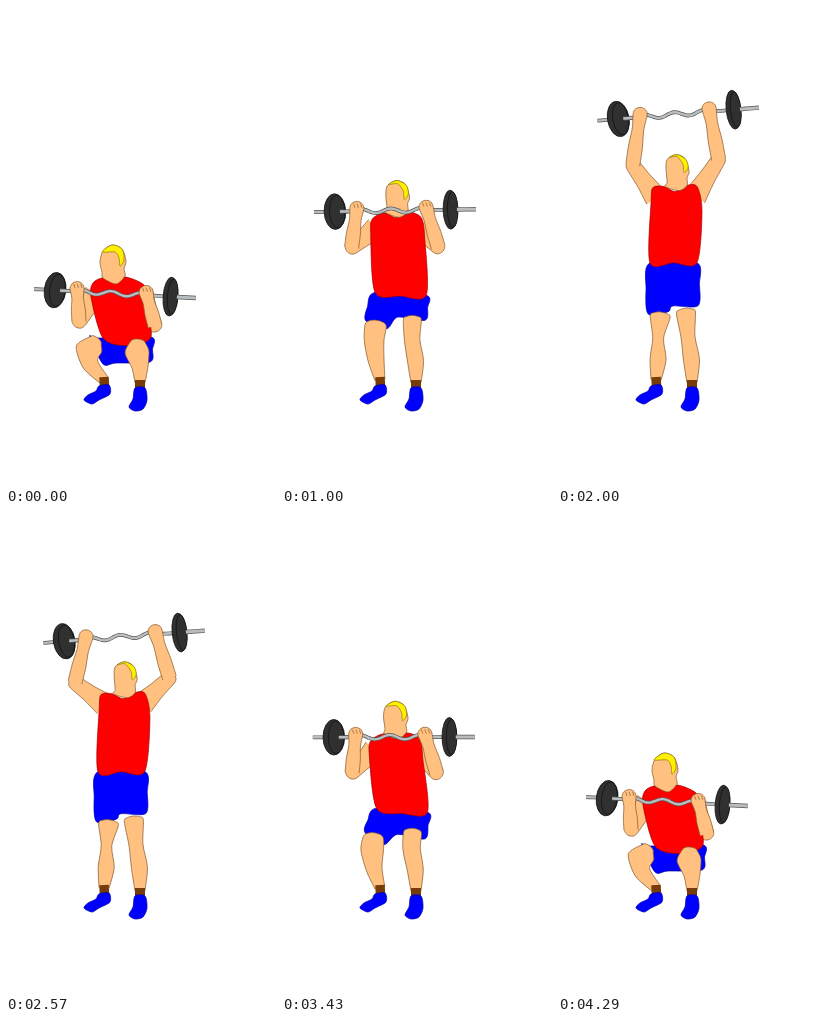
Write an HTML page with a canvas that moves like this. It is 270 px wide and 480 px high and loops after 4.44 s.

```html
<!DOCTYPE html>
<html lang="en">
<head>
<meta charset="utf-8">
<title>Squat press</title>
<style>
  html, body { margin: 0; width: 100%; height: 100%; overflow: hidden; background: #fff; }
  canvas { display: block; width: 100%; height: 100%; }
</style>
</head>
<body>
<canvas id="stage" width="270" height="480"></canvas>
<script>
const ctx = document.getElementById('stage').getContext('2d');
const LOOP = 4440, FPS = 7, TOP = 15;
const SKIN = '#ffc080', SKIN_EDGE = '#80552c', RED = '#ff0000', BLUE = '#0000ff',
      YELLOW = '#fff000', SOCK = '#783c08', IRON = '#303030';

// Joints at five moments, from the squat to the full press; a third number is a half width.
const STEPS = [0, 4, 8, 11, TOP];
const JOINTS = {
  neck:      [[108, 272], [111, 244], [115, 196], [117, 181], [117, 181]],
  shoulderL: [[87, 277], [87, 251], [92, 201], [95, 182], [95, 182]],
  shoulderR: [[138, 279], [136, 250], [140, 200], [139, 181], [139, 181]],
  elbowL:    [[73, 316], [71, 288], [69, 225], [67, 177], [76, 158]],
  elbowR:    [[149, 320], [152, 290], [158, 224], [164, 173], [160, 152]],
  waistL:    [[97, 332], [97, 309], [92, 279], [92, 260], [92, 257]],
  waistR:    [[145, 331], [147, 314], [143, 281], [139, 260], [139, 257]],
  cuffL:     [[84, 331], [82, 325], [85, 312], [90, 308], [90, 308]],
  inseam:    [[97, 358], [97, 345], [107, 316], [110, 306], [110, 306]],
  crotch:    [[110, 357], [114, 338], [116, 304], [115, 300], [115, 300]],
  cuffR:     [[144, 356], [142, 344], [143, 306], [140, 300], [140, 300]],
  thighL:    [[90, 335, 7], [88, 331, 9], [96, 316, 11], [102, 311, 10], [102, 311, 10]],
  kneeL:     [[83, 343, 13], [87, 339, 13.5], [94, 333, 8.5], [100, 332, 5.5], [100, 332, 5.5]],
  thighR:    [[132, 337, 8], [131, 328, 9], [130, 310, 9], [128, 307, 9.5], [128, 307, 9.5]],
  kneeR:     [[131, 346, 12], [129, 338, 10.5], [130.5, 333, 7], [130, 331, 7], [130, 331, 7]]
};
// Centre and tilt in degrees
const BAR = [[109, 287.5, 3.2], [110, 255, 1.4], [114, 186.5, -1.8], [117, 133.5, -4], [120.5, 106, -4.6]];

// Head outlines around the neck, looking ahead and looking up
const FACE = [
  [[-11, -27], [-2, -33], [8, -29], [12, -17], [10, -9], [11, -2], [2, 6], [-11, 0], [-12, -6], [-14, -16]],
  [[-8, -27], [1, -32], [10, -28], [14, -15], [12, -9], [12, -1], [4, 4], [-10, 0], [-8, -4], [-9, -18]]
];
const HAIR = [
  [[-12, -26], [-2, -33], [8, -29], [10, -18], [6, -12], [5, -20], [1, -26]],
  [[-6, -29], [2, -32], [11, -27], [13, -19], [9, -14], [8, -22], [2, -30]]
];
const SHOE_L = [[93, 380], [103, 379], [104, 388], [93, 394], [86, 398], [78, 394], [82, 389], [90, 385]];
const SHOE_R = [[129, 382], [139, 382], [141, 394], [137, 403], [129, 405], [123, 401], [127, 393]];

const mix = (a, b, t) => a.map((v, i) => v + (b[i] - v) * t);
const add = (p, x, y) => [p[0] + x, p[1] + y];
const clamp = v => Math.max(0, Math.min(1, v));

// Smooth interpolation through the steps, at rest at both ends
function track(keys, k) {
  const last = STEPS.length - 1;
  const i = Math.min(last - 1, STEPS.findLastIndex(s => s <= k));
  const h = STEPS[i + 1] - STEPS[i], u = (k - STEPS[i]) / h, s = u * u * (3 - 2 * u);
  const slope = (j, n) => j < 1 || j >= last ? 0 :
    (keys[j + 1][n] - keys[j - 1][n]) / (STEPS[j + 1] - STEPS[j - 1]);
  return mix(keys[i], keys[i + 1], s).map((v, n) =>
    v + h * u * (1 - u) * (slope(i, n) * (1 - u) - slope(i + 1, n) * u));
}

function curve(pts, closed) {
  const n = pts.length, tension = 0.14;
  const at = i => closed ? pts[(i + n) % n] : pts[Math.max(0, Math.min(n - 1, i))];
  ctx.beginPath();
  ctx.moveTo(...pts[0]);
  for (let i = 0; i < (closed ? n : n - 1); i++) {
    const [a, b, c, d] = [at(i - 1), at(i), at(i + 1), at(i + 2)];
    ctx.bezierCurveTo(b[0] + (c[0] - a[0]) * tension, b[1] + (c[1] - a[1]) * tension,
      c[0] - (d[0] - b[0]) * tension, c[1] - (d[1] - b[1]) * tension, c[0], c[1]);
  }
}

function paint(fill, edge, width = 0.7) {
  ctx.fillStyle = fill;
  ctx.fill();
  ctx.strokeStyle = edge;
  ctx.lineWidth = width;
  ctx.stroke();
}

function shape(pts, fill, edge) {
  curve(pts, true);
  paint(fill, edge);
}

function line(pts, color, width) {
  curve(pts, false);
  ctx.strokeStyle = color;
  ctx.lineWidth = width;
  ctx.stroke();
}

// A limb of varying width: rounded at its first node, open at its last
function limb(nodes, cap) {
  const sides = [[], []];
  let tip;
  nodes.forEach(([x, y, r], i) => {
    const a = nodes[Math.max(0, i - 1)], b = nodes[Math.min(nodes.length - 1, i + 1)];
    const len = Math.hypot(b[0] - a[0], b[1] - a[1]);
    const dx = (b[0] - a[0]) / len * r, dy = (b[1] - a[1]) / len * r;
    sides[0].unshift([x - dy, y + dx]);
    sides[1].push([x + dy, y - dx]);
    if (!i) {
      const c = cap * 0.75;
      tip = [[x - dy * 0.65 - dx * c, y + dx * 0.65 - dy * c], [x - dx * cap, y - dy * cap],
             [x + dy * 0.65 - dx * c, y - dx * 0.65 - dy * c]];
    }
  });
  curve([...sides[0], ...tip, ...sides[1]], false);
  paint(SKIN, SKIN_EDGE);
}

function leg(thigh, knee, ankle, bulge) {
  const calf = add(mix(knee, ankle, 0.5), bulge, 0);
  limb([thigh, knee, [...calf, 8], ankle], 0.5);
}

function upperArm(elbow, shoulder) {
  limb([[...elbow, 7], [...mix(elbow, shoulder, 0.5), 8.5], [...shoulder, 11.5]], 0.85);
}

function forearm(hand, elbow) {
  limb([[...hand, 7], [...mix(hand, elbow, 0.3), 5.8], [...mix(hand, elbow, 0.65), 7], [...elbow, 7]], 0.9);
}

function fingers([x, y]) {
  for (let i = -1; i < 2; i++) line([[x + i * 3.5, y - 4], [x + i * 3.5 + 1.5, y]], SKIN_EDGE, 0.7);
}

function rod(pts, width) {
  line(pts, '#555', width);
  line(pts, '#b9bdc0', width - 1.4);
}

function plate(x, rx, ry, tilt) {
  for (const size of [1, 0.72]) {
    ctx.beginPath();
    ctx.ellipse(x + (1 - size) * 8, 0, rx * size, ry * (0.7 + 0.3 * size), tilt, 0, 2 * Math.PI);
    paint(IRON, '#141414', 0.8);
  }
}

function barbell(x, y, tilt) {
  const grip = [[-81, 0], [-45, 0]];
  for (let i = -34; i <= 26; i += 3) grip.push([i, -2.2 * Math.cos((i + 4) * Math.PI / 15)]);
  grip.push([40, 0], [60, 0]);
  ctx.save();
  ctx.translate(x, y);
  ctx.rotate(tilt);
  rod(grip, 3.8);
  plate(-60, 10.8, 17.8, tilt * 1.2);
  plate(55.5, 7.3, 19.5, tilt * 0.3);
  rod([[-55, 0], [-46, 0]], 4);
  rod([[62, 0], [81, 0]], 4.4);
  ctx.restore();
}

function draw(k) {
  const j = {};
  for (const name in JOINTS) j[name] = track(JOINTS[name], k);
  const [bx, by, deg] = track(BAR, k), tilt = deg * Math.PI / 180;
  const onBar = x => [bx + x * Math.cos(tilt), by + x * Math.sin(tilt) - 3.5];
  const handL = onBar(-38), handR = onBar(31);
  const crouch = clamp((j.neck[1] - 181) / 91), lookUp = clamp((k - 4) / 4);

  ctx.fillStyle = '#fff';
  ctx.fillRect(0, 0, 270, 480);

  upperArm(j.elbowL, add(j.shoulderL, 3, 10));
  upperArm(j.elbowR, add(j.shoulderR, -2, 10));

  shape([j.waistL, j.waistR, add(mix(j.waistR, j.cuffR, 0.5), 2, 0), j.cuffR, j.crotch,
    j.inseam, j.cuffL, add(mix(j.cuffL, j.waistL, 0.5), -3, 0)], BLUE, '#0000a0');

  const flare = 5 * (1 - crouch);
  shape([j.shoulderL, add(j.neck, -11, 0), add(j.neck, 0, 5), add(j.neck, 11, -1), j.shoulderR,
    add(j.shoulderR, flare, 14 + flare * 2), j.waistR,
    add(mix(j.waistR, j.waistL, 0.5), 0, 8 * crouch), j.waistL,
    add(j.shoulderL, -2, 14)], RED, '#a00000');

  leg(j.thighL, j.kneeL, [98, 374, 5], 1 - 7 * crouch);
  leg(j.thighR, j.kneeR, [134, 377, 5], 1.5);
  line([[98, 371], [98.5, 381]], SOCK, 9.5);
  line([[134, 374], [134, 384]], SOCK, 10);
  shape(SHOE_L, BLUE, '#0000a0');
  shape(SHOE_R, BLUE, '#0000a0');

  const head = ([ahead, up]) => ahead.map((p, i) => add(mix(p, up[i], lookUp), ...j.neck));
  shape(head(FACE), SKIN, SKIN_EDGE);
  shape(head(HAIR), YELLOW, '#8a7a10');

  barbell(bx, by, tilt);
  forearm(handL, j.elbowL);
  forearm(handR, j.elbowR);
  if (k < 10) [handL, handR].forEach(fingers);
}

function tick(now) {
  const t = Math.floor((now % LOOP) / 10);
  const n = Math.min(2 * TOP, Math.floor((t + 0.5) * FPS / 100));
  draw(TOP - Math.abs(TOP - n));
  requestAnimationFrame(tick);
}
ctx.lineJoin = 'round';
tick(performance.now());
</script>
</body>
</html>
```
